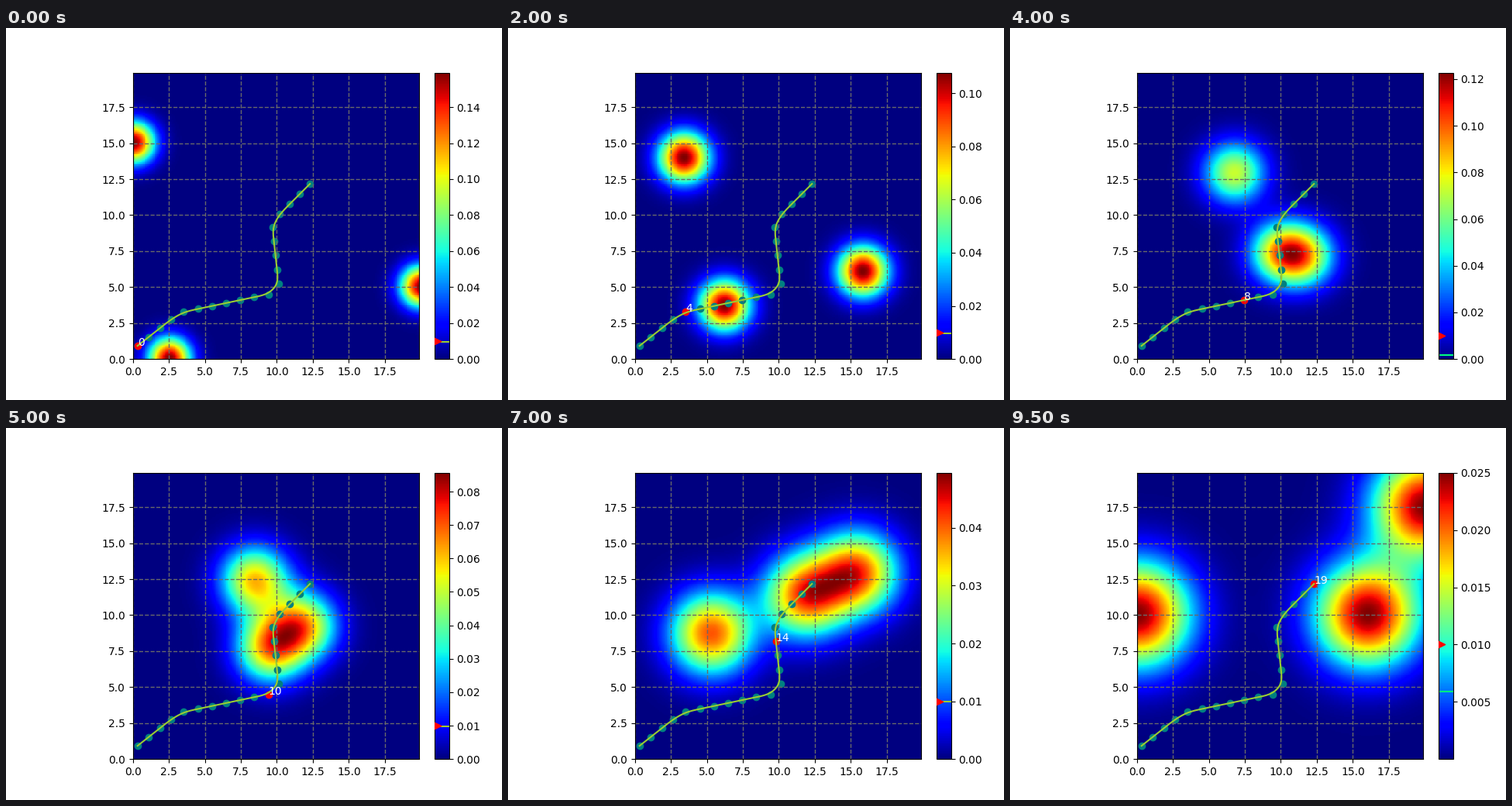
These frames come from a looping animation (640 px wide and 480 px high, 10 s). A matplotlib script:

```python
import numpy as np
import matplotlib.pyplot as plt
from matplotlib.animation import FuncAnimation

STEPS = 20
INTERVAL = 500
LIMIT = 0.01

# Each hazard travels in a straight line from start to end
HAZARDS = [((0, 15), (16, 10)), ((2.5, 0), (20, 17.5)), ((20, 5), (0, 10))]

axis_points = np.arange(200) * 0.1
grid_x, grid_y = np.meshgrid(axis_points, axis_points)


def risk(x, y, step):
    """Sum of Gaussians that spread by 5 % per step."""
    var = 1.05 ** (2 * step)
    total = 0
    for start, end in HAZARDS:
        cx, cy = np.array(start) + np.subtract(end, start) * step / (STEPS - 1)
        total = total + np.exp(-((x - cx) ** 2 + (y - cy) ** 2) / (2 * var))
    return total / (2 * np.pi * var)


def make_route():
    """Unit steps along a list of headings."""
    headings = np.radians([38.3] * 3 + [30] + [11.8] * 6 + [45]
                          + [96.3] * 4 + [60] + [45] * 3)
    moves = np.column_stack([np.cos(headings), np.sin(headings)])
    return np.vstack([[0, 0], np.cumsum(moves, axis=0)]) + [0.32, 0.92]


def b_spline(points, samples=12):
    """Cubic B-spline that starts and ends on the outer points."""
    p = np.vstack([points[:1]] * 2 + [points] + [points[-1:]] * 2)
    t = np.linspace(0, 1, samples)[:, None]
    weights = [(1 - t) ** 3, 3 * t**3 - 6 * t**2 + 4,
               -3 * t**3 + 3 * t**2 + 3 * t + 1, t**3]
    return np.vstack([sum(w * p[i + j] for j, w in enumerate(weights)) / 6
                      for i in range(len(p) - 3)])


route = make_route()
curve = b_spline(route)

fig, ax = plt.subplots(figsize=(6.4, 4.8), dpi=100)
ax.set_aspect("equal")
mesh = ax.pcolormesh(axis_points, axis_points,
                     risk(grid_x, grid_y, 0)[:-1, :-1], cmap="jet")
ax.set(xlim=(0, 19.9), ylim=(0, 19.9))
ticks = np.arange(0, 19, 2.5)
ax.set_xticks(ticks)
ax.set_yticks(ticks)
ax.grid(color="dimgray", linestyle="--", linewidth=1)

bar = fig.colorbar(mesh, ax=ax, fraction=0.046, pad=0.04)
level, = bar.ax.plot([0, 1], [LIMIT, LIMIT], lw=1.5)
bar.ax.scatter([0.2], [LIMIT], marker=">", color="r", s=36, zorder=3)
bar.ax.set_xlim(0, 1)

ax.scatter(*route.T, color="teal")
robot = ax.scatter(*route[0], color="r")
ax.plot(*curve.T, color="yellowgreen", lw=1.5)
label = ax.text(*route[0], "0", color="w")


def update(step):
    field = risk(grid_x, grid_y, step)[:-1, :-1]
    mesh.set_array(field)
    mesh.set_clim(field.min(), field.max())
    here = risk(*route[step], step)
    level.set_ydata([here, here])
    level.set_color("springgreen" if here < 0.9 * LIMIT else "yellowgreen")
    robot.set_offsets([route[step]])
    label.set_position(route[step])
    label.set_text(str(step))
    return mesh, level, robot, label


anim = FuncAnimation(fig, update, frames=STEPS, interval=INTERVAL,
                     repeat=True, repeat_delay=0, blit=False)
plt.show()
```
